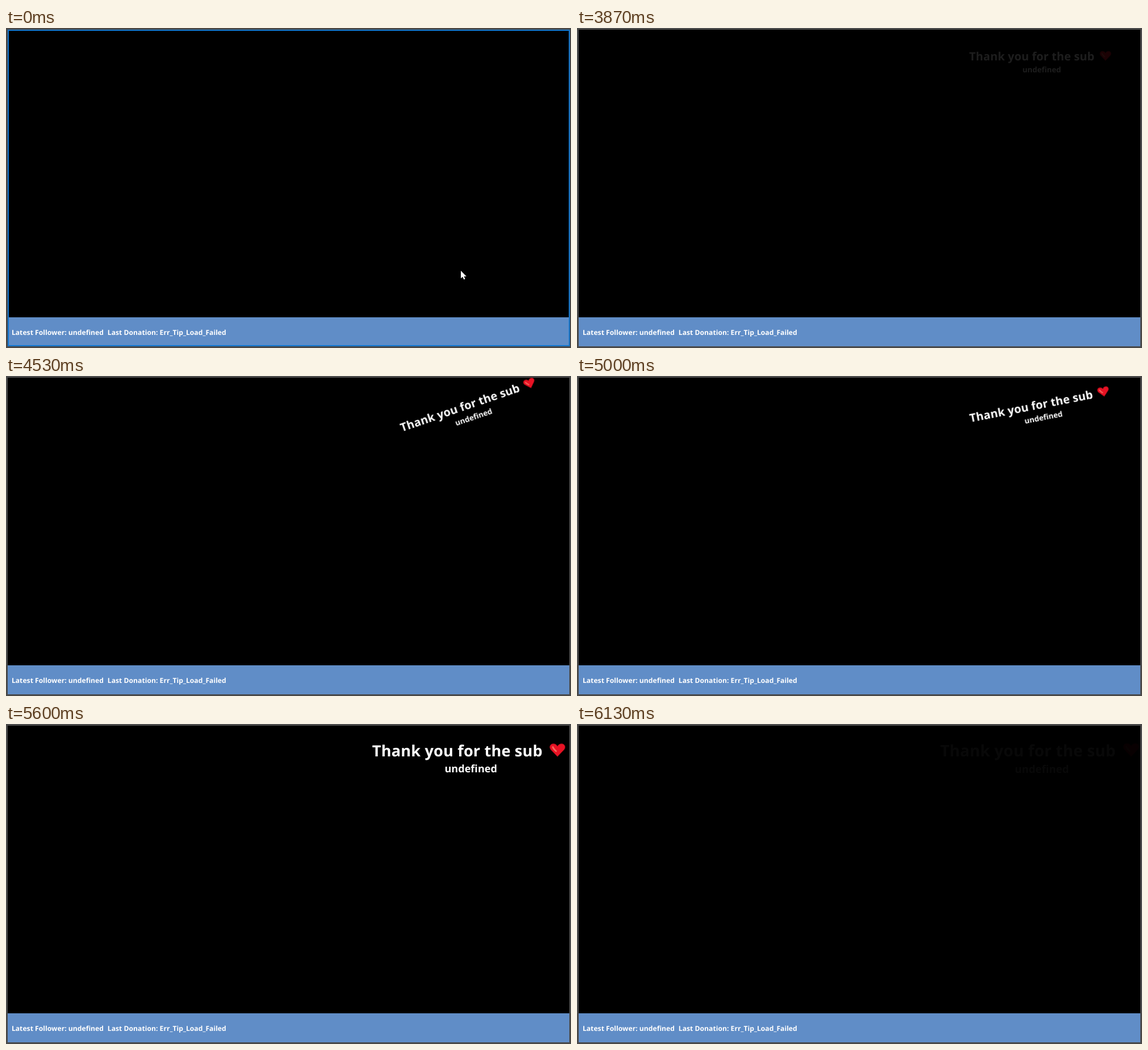
These frames come from a looping animation (995x563 px, 8 s). An HTML page:

```html
<!DOCTYPE html>
<html lang="en">
<head>
<meta charset="utf-8">
<title>Stream overlay</title>
<style>
  html, body { margin: 0; width: 100%; height: 100%; overflow: hidden; background: #4a4a4a; }
  svg { display: block; width: 995px; height: 563px; }
  text {
    font-family: "Open Sans", "Noto Sans", sans-serif;
    font-weight: 700;
    fill: #fff;
    text-rendering: geometricPrecision;
    white-space: pre;
  }
  .info { font-size: 12.18px; }
  .title { font-size: 20px; letter-spacing: .1px; }
  .name { font-size: 13.33px; text-anchor: middle; }

  /* Paused: the script sets --t on a 15 fps grid. */
  .anim {
    animation: 8s linear both paused;
    animation-delay: calc(var(--t, 0) * -1ms);
  }
  #alert { animation-name: alert; transform-origin: 818px 57.5px; }
  #cursor { animation-name: leave; animation-timing-function: step-end; }
  #focus { animation-name: blur; animation-timing-function: step-end; }

  @keyframes alert {
    0%, 47.75% { opacity: 0; transform: rotate(0deg) scale(1); }
    52.75% {
      opacity: 1; transform: rotate(0deg) scale(1);
      animation-timing-function: cubic-bezier(.5, 1, .89, 1);
    }
    57.95%, 60.3% { opacity: 1; transform: rotate(-20deg) scale(1); }
    65.2% { opacity: 1; transform: rotate(0deg) scale(1); }
    70.55%, 71.125% { opacity: 1; transform: rotate(0deg) scale(1.4); }
    76.66%, 100% { opacity: .035; transform: rotate(0deg) scale(1.4); }
  }
  @keyframes leave {
    0% { transform: translate(801px, 427px); opacity: 1; }
    .8% { transform: translate(812px, 482px); opacity: 1; }
    1.6% { transform: translate(822px, 548px); opacity: 1; }
    2.4%, 100% { transform: translate(822px, 548px); opacity: 0; }
  }
  @keyframes blur {
    0% { opacity: 1; }
    2.4%, 100% { opacity: 0; }
  }
</style>
</head>
<body>
<svg viewBox="0 0 995 563">
  <rect width="995" height="563" fill="#4a4a4a"/>
  <rect x="3" y="3" width="989" height="506"/>
  <rect x="3" y="509" width="989" height="51" fill="#608dc7"/>
  <rect id="focus" class="anim" x="4" y="4" width="988" height="555" fill="none" stroke="#1177d1" stroke-width="2"/>

  <text class="info" x="9.9" y="540">Latest Follower: undefined</text>
  <text class="info" x="178.8" y="540">Last Donation: Err_Tip_Load_Failed</text>

  <g id="alert" class="anim">
    <text class="title" x="690.6" y="57">Thank you for the sub</text>
    <text class="name" x="818.5" y="77.8">undefined</text>
    <g transform="translate(930.7 49)">
      <path d="M0 8.4L-8.6 -.6C-11.2 -3.6 -9.6 -8.2 -5.4 -8.2C-2.8 -8.2 -1.2 -7 0 -5C1.2 -7 2.8 -8.2 5.4 -8.2C9.6 -8.2 11.2 -3.6 8.6 -.6Z"
        fill="#e81224" stroke="#8a0c16" stroke-width=".7" stroke-linejoin="round"/>
      <path d="M-6 -4Q-5.4 -2 -1.8 1.4" fill="none" stroke="#f4695c" stroke-width="2" stroke-linecap="round"/>
    </g>
  </g>

  <g id="cursor" class="anim">
    <path d="M0 0V13.6L3.2 10.8L5.3 15.6L7.6 14.6L5.5 9.9H9.8Z" fill="#fff" stroke="#000" stroke-width="1" paint-order="stroke"/>
  </g>
</svg>
<script>
  const LOOP = 8000, STEP = 1000 / 15;
  const start = performance.now();

  function draw() {
    const t = (performance.now() - start) % LOOP;
    const k = Math.min(119, Math.floor((t + 5) / STEP));
    document.documentElement.style.setProperty("--t", k * STEP);
    requestAnimationFrame(draw);
  }
  draw();
</script>
</body>
</html>
```
